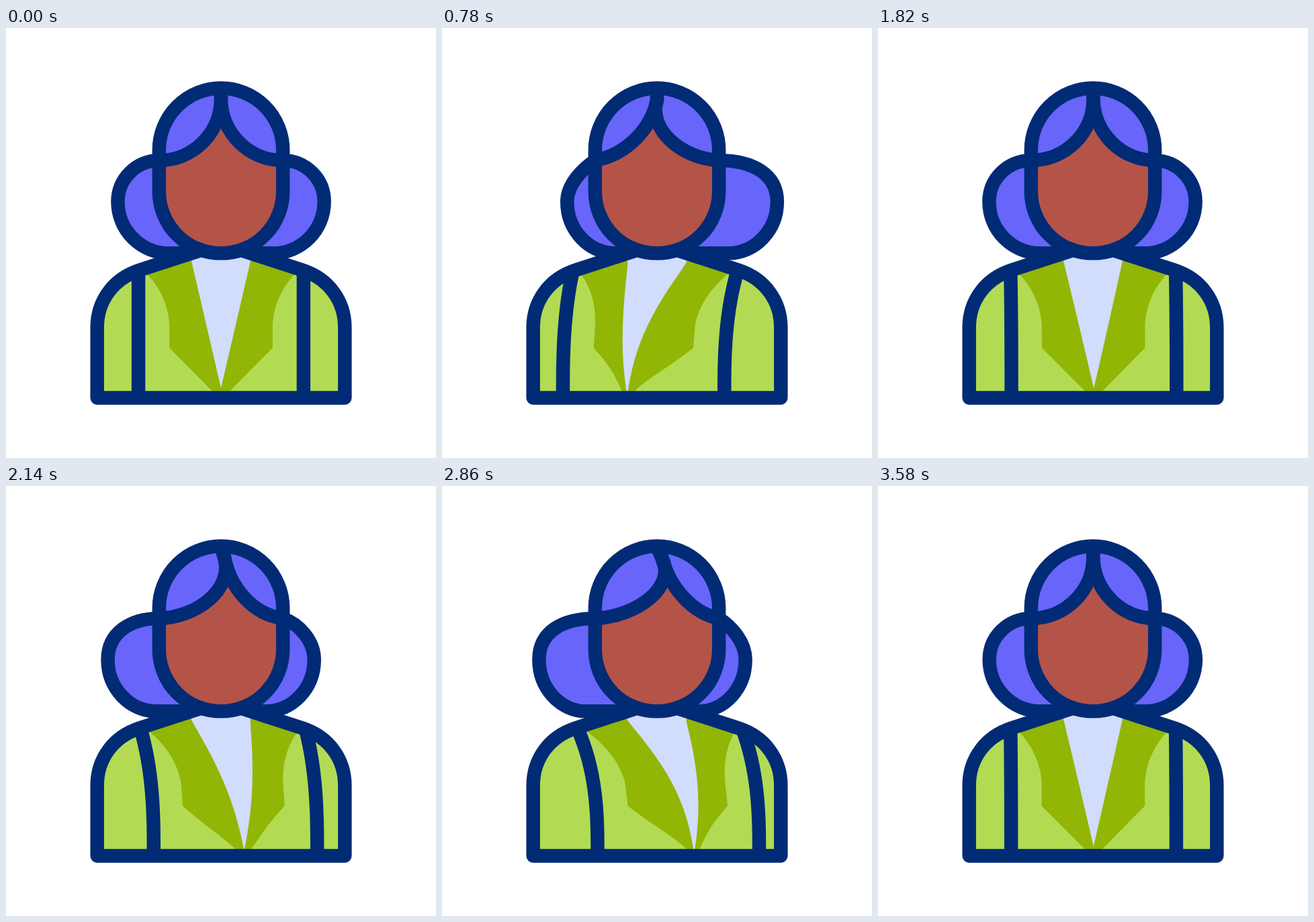
Animation, 640 px wide and 640 px high, one loop 3600 ms. Source, as an HTML page with a canvas:

```html
<!DOCTYPE html>
<html lang="en">
<head>
<meta charset="utf-8">
<title>Swaying figure</title>
<style>
  html, body { margin: 0; width: 100%; height: 100%; overflow: hidden; background: #fff; }
  canvas { display: block; width: 640px; height: 640px; }
</style>
</head>
<body>
<canvas id="stage" width="640" height="640"></canvas>
<script>
const ctx = document.getElementById('stage').getContext('2d');
const LOOP = 3600, PEAK = 1000;
const UNIT = 20.48; // one line width; the origin is the centre of the stage
const ROUND = 0.5523; // handle length of a quarter circle
const SIDES = [-1, 1];
const NAVY = '#022b75', PURPLE = '#6865fa', SKIN = '#b45448';
const LIME = '#b2db53', OLIVE = '#91b605', SHIRT = '#d2dcfd';

// Swing from -1 to 1: quick out, slower back, mirrored in the second half.
function sway(t) {
  if (t > LOOP / 2) return -sway(LOOP - t);
  return t < PEAK ? Math.sin(Math.PI / 2 * t / PEAK)
                  : Math.cos(Math.PI / 2 * (t - PEAK) / (LOOP / 2 - PEAK));
}

const soften = s => Math.sign(s) * Math.abs(s) ** 1.25;

function fill(path, color) {
  ctx.fillStyle = color;
  ctx.fill(path);
}

function stroke(path) {
  ctx.strokeStyle = NAVY;
  ctx.lineWidth = 1;
  ctx.lineJoin = 'round';
  ctx.stroke(path);
}

function clipped(path, paint) {
  ctx.save();
  ctx.clip(path);
  paint();
  ctx.restore();
}

const head = new Path2D();
head.arc(0, -6.75, 4.5, Math.PI, 0);
head.arc(0, -3.75, 4.5, 0, Math.PI);
head.closePath();

const bodyLine = new Path2D(
  'M-1.46 .53 L-5.9 1.97 C-7.83 2.6 -9 4.2 -9 6.15 V11.25 H9 V6.15 C9 4.2 7.83 2.6 5.9 1.97 L1.46 .53');

// The cloth swings sideways: more towards the hem, the middle and the trailing side.
function drape([x, y], s) {
  const u = Math.min(1, Math.max(0, (y - 1.5) / 9.5));
  const weight = 1 - (1 - u) ** 2.7;
  const bulge = 1.4 * Math.exp(-(((x - 0.6 * s) / 2.2) ** 2));
  const reach = (s > 0 ? 1.03 : 1.69) + 0.025 * s * x + bulge;
  return [x - s * reach * weight, y];
}

const line = (a, b) => v => a.map((p, i) => p + (b[i] - p) * v);

const cubic = (a, b, c, d) => v => a.map((p, i) =>
  p * (1 - v) ** 3 + 3 * b[i] * v * (1 - v) ** 2 + 3 * c[i] * v * v * (1 - v) + d[i] * v ** 3);

// Sampled curve, bent by the swing.
function draped(curve, s, steps = 16) {
  return Array.from({ length: steps + 1 }, (_, i) => drape(curve(i / steps), s));
}

function polyline(points) {
  const p = new Path2D();
  points.forEach(([x, y]) => p.lineTo(x, y));
  return p;
}

function drawHair(side, s) {
  const out = side * s;
  const x = side * 7.5 + s * (1.17 + 0.15 * side * Math.max(s, 0));
  const flat = side * (3.75 + out * (out > 0 ? 1.5 : 0.8));
  const p = new Path2D();
  p.moveTo(side * 4.5, -6);
  p.bezierCurveTo(side * (4.5 + 3 * ROUND + 0.8 * out), -6 + 0.65 * Math.max(-out, 0),
                  x, -3 - 3 * ROUND - 0.4 * out, x, -3);
  p.bezierCurveTo(x, -3 + 3.75 * ROUND, flat + ROUND * (x - flat), 0.75, flat, 0.75);
  p.lineTo(0, 0.75);
  const area = new Path2D(p);
  area.lineTo(0, -6);
  fill(area, PURPLE);
  stroke(p);
}

function drawJacket(s) {
  const soft = soften(s);
  for (const side of SIDES) {
    const at = (x, y) => [side * x, y];
    const corner = at(3.75, 7.62);
    const lapel = [
      at(0, 0.5), at(5.6, 2.05),
      ...draped(cubic(at(5.6, 2.05), at(4.3, 3.2), at(3.75, 4.9), at(3.75, 6.1)), soft),
      ...draped(line(corner, at(0.4, 11)), soft),
      drape([0, 11], soft)
    ];
    // The inner edge lies under the shirt.
    lapel.push(...draped(line([0, 11], [0, 0.5]), soft));
    fill(polyline(lapel), OLIVE);
  }
  const tip = [0, 10.55 + 0.6 * Math.abs(soft)];
  const shirt = [
    ...draped(line([-2.27, 0.78], tip), soft),
    ...draped(line(tip, [2.27, 0.78]), soft)
  ];
  fill(polyline([[-1.4, 0.5], ...shirt, [1.4, 0.5]]), SHIRT);
  for (const side of SIDES) {
    stroke(polyline(draped(line([side * 6, 1.9], [side * 6, 11.2]), s)));
  }
}

function fringe(side, s) {
  const size = Math.abs(s), out = side * s;
  const lean = -s * (s > 0 ? 0.58 : 1.29);
  const p = new Path2D();
  p.moveTo(0, -11.25);
  p.lineTo(0.4 * Math.max(-s, 0), -10.5 + 0.12 * size);
  p.bezierCurveTo(lean * (1 + 0.22 * out), -10.5 + 4.5 * ROUND - 0.25 * size,
                  side * 4.5 * (1 - ROUND) + 0.43 * lean, -6 - 0.3 * size + 0.15 * out,
                  side * 4.5, -6);
  return p;
}

function drawFringe(s) {
  const curves = SIDES.map(side => fringe(side, s));
  curves.forEach((curve, i) => {
    const side = SIDES[i];
    const area = new Path2D(curve);
    area.arc(0, -6.75, 4.5, side < 0 ? Math.PI : 0, -Math.PI / 2, side > 0);
    fill(area, PURPLE);
  });
  curves.forEach(stroke);
}

function draw(t) {
  const s = sway(t);
  ctx.setTransform(1, 0, 0, 1, 0, 0);
  ctx.fillStyle = '#fff';
  ctx.fillRect(0, 0, 640, 640);
  ctx.setTransform(UNIT, 0, 0, UNIT, 320, 320);

  SIDES.forEach(side => drawHair(side, s));

  fill(bodyLine, LIME);
  clipped(bodyLine, () => drawJacket(s));
  stroke(bodyLine);

  fill(head, SKIN);
  clipped(head, () => drawFringe(s));
  stroke(head);
}

function tick() {
  draw(performance.now() % LOOP);
  requestAnimationFrame(tick);
}
tick();
</script>
</body>
</html>
```
